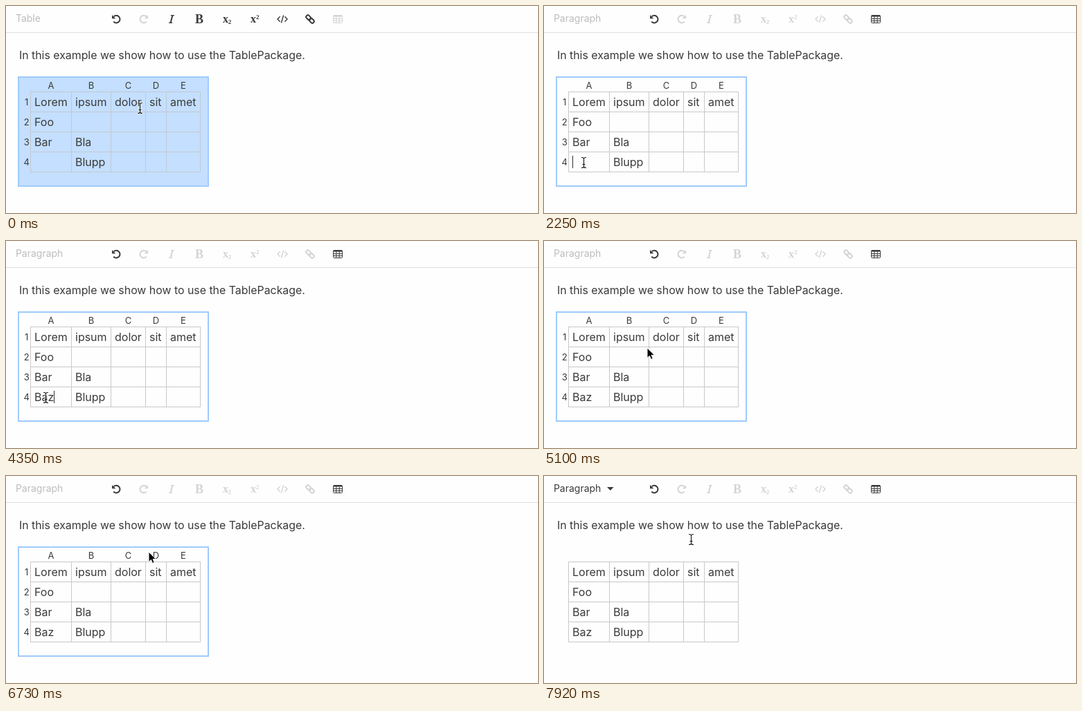
Recreate the animation shown at these times as an HTML page. Size 768 by 300 pixels, loop 8 s.

```html
<!DOCTYPE html>
<html lang="en">
<head>
<meta charset="utf-8">
<title>Table editing</title>
<style>
html, body { margin: 0; width: 100%; height: 100%; overflow: hidden; background: #fefefe; }
svg { display: block; width: 768px; height: 300px; }
text { font-family: Inter, Roboto, sans-serif; fill: #3a3a3a; }
.cell { font-size: 16px; }
.head { font-size: 13px; text-anchor: middle; }
.icon { color: #3a3a3a; fill: none; stroke: currentColor; stroke-width: 2; }
.icon.off { color: #d4d4d4; }
.icon .solid { fill: currentColor; stroke: none; }
.icon text { fill: currentColor; stroke: none; text-anchor: middle; font-family: "Liberation Serif", serif; font-weight: bold; }
</style>
</head>
<body>
<svg viewBox="0 0 768 300">
  <rect width="768" height="300" fill="#fefefe"/>
  <path d="M0 38.5H768" stroke="#dedede"/>
  <text id="label" x="13.9" y="23" font-size="14"></text>
  <path id="arrowDown" d="M91 16H100.5L95.75 21Z" fill="#3a3a3a"/>

  <g class="icon">
    <path d="M155.2 22.6A5.3 5.3 0 1 0 155.6 15.2"/>
    <path class="solid" d="M153 13V18.3H158.3Z"/>
  </g>
  <g class="icon off" transform="translate(358) scale(-1 1)">
    <path d="M155.2 22.6A5.3 5.3 0 1 0 155.6 15.2"/>
    <path class="solid" d="M153 13V18.3H158.3Z"/>
  </g>
  <g class="icon mark">
    <path d="M240.4 13.5L237.6 24.5"/>
    <path d="M237.8 13.6H243M235 24.4H240.2" stroke-width="1.2"/>
  </g>
  <g class="icon mark"><text x="279" y="25" font-size="18">B</text></g>
  <g class="icon mark"><text x="317" y="23.5" font-size="16">x</text><text x="323" y="25.5" font-size="9">2</text></g>
  <g class="icon mark"><text x="357" y="23.5" font-size="16">x</text><text x="363.3" y="18.5" font-size="9">2</text></g>
  <g class="icon mark">
    <path d="M395.6 15.2L392 19L395.6 22.8M402.4 15.2L406 19L402.4 22.8M400.6 13.5L397.4 24.5" stroke-width="1.4"/>
  </g>
  <g class="icon mark" transform="rotate(45 439 19)">
    <rect x="432" y="16.5" width="7.4" height="5" rx="2.3"/>
    <rect x="438.6" y="16.5" width="7.4" height="5" rx="2.3"/>
  </g>
  <g class="icon" id="tableIcon">
    <rect x="472.5" y="13.5" width="13" height="11" rx="1" stroke-width="1"/>
    <path class="solid" d="M473 13H485V15.5H473Z"/>
    <path d="M476.8 15V24.5M481.2 15V24.5M473 18.5H485M473 21.5H485" stroke-width="1"/>
  </g>

  <text x="18.9" y="77" font-size="15.88">In this example we show how to use the TablePackage.</text>

  <rect id="frame" x="18" y="103" width="274" height="158" stroke="#9fcbfc" stroke-width="2"/>
  <path id="grid" fill="none" stroke="#c8c8c8"/>
  <g id="heads"></g>
  <g id="cells"></g>
  <text id="typed" class="cell" x="41" y="232"></text>
  <rect id="caret" y="217" width="1" height="18" fill="#333"/>

  <g id="beam" fill="none" stroke-linecap="round">
    <path d="M-3 -7.5Q0 -7.5 0 -5.5Q0 -7.5 3 -7.5M0 -6V6M-3 7.5Q0 7.5 0 5.5Q0 7.5 3 7.5M-1.5 2.5H1.5" stroke="#fff" stroke-opacity=".7" stroke-width="2.6"/>
    <path d="M-3 -7.5Q0 -7.5 0 -5.5Q0 -7.5 3 -7.5M0 -6V6M-3 7.5Q0 7.5 0 5.5Q0 7.5 3 7.5M-1.5 2.5H1.5" stroke="#111" stroke-width="1.1"/>
  </g>
  <path id="pointer" d="M0 0V14.5L3.4 11.4L5.6 16.5L8.2 15.4L6 10.4H10.6Z" fill="#000" stroke="#fff" stroke-width="1"/>
</svg>
<script>
const LOOP = 8000, SELECT_END = 2250, BLUR = 7170;
const $ = id => document.getElementById(id);
const NS = "http://www.w3.org/2000/svg";

const colX = [35.5, 94.5, 151.5, 201.5, 231.5, 280.5];
const rowY = i => 124.5 + 29 * i;
const rows = [["Lorem", "ipsum", "dolor", "sit", "amet"], ["Foo"], ["Bar", "Bla"], ["", "Blupp"]];

function addText(parent, cls, x, y, str) {
  const el = document.createElementNS(NS, "text");
  el.setAttribute("class", cls);
  el.setAttribute("x", x);
  el.setAttribute("y", y);
  el.textContent = str;
  parent.append(el);
}

let lines = colX.map(x => `M${x} 124V241`).join("");
for (let i = 0; i < 5; i++) lines += `M35 ${rowY(i)}H281`;
$("grid").setAttribute("d", lines);

rows.forEach((row, r) => {
  addText($("heads"), "head", 29.7, rowY(r) + 19, r + 1);
  row.forEach((str, c) => str && addText($("cells"), "cell", colX[c] + 5.5, rowY(r) + 20.5, str));
});
[..."ABCDE"].forEach((ch, c) => addText($("heads"), "head", (colX[c] + colX[c + 1]) / 2, 119.5, ch));

// [time, x, y, shape]; the mouse is sampled, so each place is held
const mouse = [
  [0, 193.5, 148, "beam"], [600, 186, 150, "beam"], [750, 158, 168, "beam"],
  [900, 115, 198, "beam"], [1050, 78, 223, "beam"], [1200, 60, 231, "beam"],
  [1350, 57.5, 227, "beam"],
  [4800, 65, 241, "pointer"], [4950, 105, 216, "pointer"], [5100, 149, 155, "pointer"],
  [5250, 191, 61, "beam"], [5550, 188, 74, "beam"], [5690, 184, 100, "pointer"],
  [5840, 184, 109, "pointer"], [6440, 191, 111, "pointer"], [6590, 200, 111, "pointer"],
  [6730, 206, 110, "pointer"], [6880, 210.5, 86, "beam"], [7020, 211.5, 66, "beam"],
  [7770, 212, 79, "beam"], [7920, 212.5, 92, "beam"]
];
// [time, letters typed]
const typing = [[0, 0], [3450, 1], [3750, 2], [4350, 3]];
const caretX = [41, 52, 60, 69];
const caretOn = [[2250, 2850], [3300, 4200], [4350, 4800], [5550, 5840], [6290, 6730]];

const held = (keys, t) => keys.findLast(k => k[0] <= t);
const show = (id, on) => $(id).setAttribute("visibility", on ? "visible" : "hidden");

function draw(t) {
  const selected = t < SELECT_END, blurred = t >= BLUR;

  $("label").textContent = selected ? "Table" : "Paragraph";
  $("label").style.fill = blurred ? "#3a3a3a" : "#bdbdbd";
  show("arrowDown", blurred);
  document.querySelectorAll(".mark").forEach(el => el.classList.toggle("off", !selected));
  $("tableIcon").classList.toggle("off", selected);

  show("frame", !blurred);
  show("heads", !blurred);
  $("frame").setAttribute("fill", selected ? "#c4dfff" : "#fefefe");
  $("grid").setAttribute("stroke", selected ? "#c3c8d0" : "#c8c8c8");

  const count = held(typing, t)[1];
  $("typed").textContent = "Baz".slice(0, count);
  $("caret").setAttribute("x", caretX[count]);
  show("caret", caretOn.some(([a, b]) => t >= a && t < b));

  const [, x, y, shape] = held(mouse, t);
  for (const id of ["beam", "pointer"]) {
    show(id, id === shape);
    $(id).setAttribute("transform", `translate(${x} ${y})`);
  }
}

const start = performance.now();
function tick() {
  draw((performance.now() - start) % LOOP);
  requestAnimationFrame(tick);
}
tick();
</script>
</body>
</html>
```
